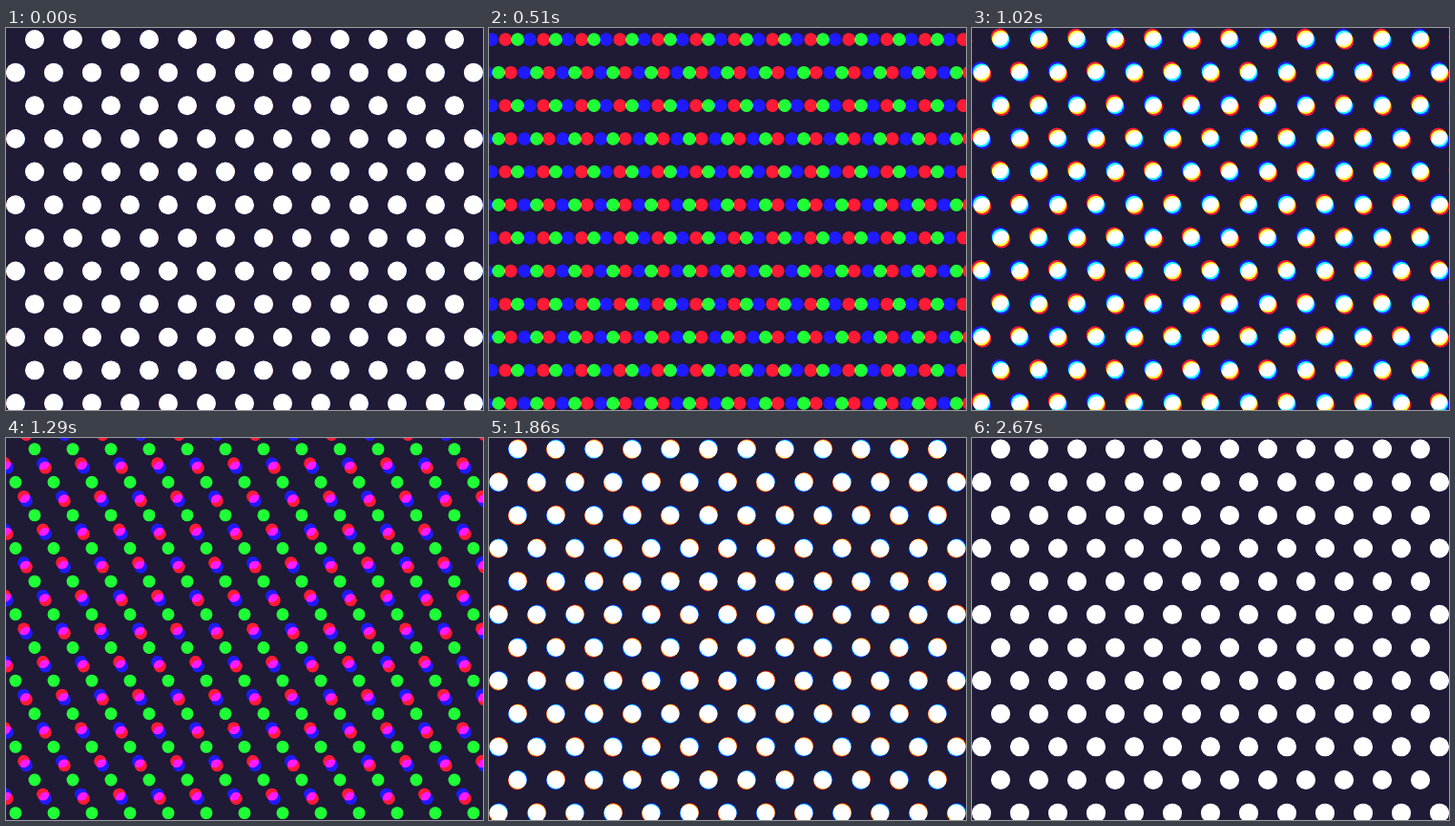
Write an HTML page with a canvas that moves like this. It is 500x400 px and loops after 2.7 s.

```html
<!DOCTYPE html>
<html lang="en">
<head>
<meta charset="utf-8">
<title>Colour dots</title>
<style>
  html, body { margin: 0; width: 100%; height: 100%; overflow: hidden; background: #1f1a36; }
  canvas { display: block; }
</style>
</head>
<body>
<canvas id="stage" width="500" height="400"></canvas>
<script>
const ctx = document.getElementById('stage').getContext('2d');
const TAU = Math.PI * 2;
const STEP = 30, PER_PHASE = 30, PHASES = 3;
const GAP = 40, ROW = GAP * Math.sqrt(3) / 2;
const R_MAX = 10, R_MIN = 6.4;

// Each phase slides along one lattice axis; neighbouring lines run opposite ways.
const phases = [
  { angle: 0, line: (a, b) => b, y: 12 },
  { angle: -TAU / 3, line: (a, b) => a, y: 11.6 },
  { angle: -TAU / 6, line: (a, b) => a + b, y: 11.6 }
];

const ease = p => p < 0.5 ? 2 * p * p : 1 - 2 * (1 - p) * (1 - p);

function drawDots(color, shift, radius, phase) {
  const dx = Math.cos(phase.angle) * shift;
  const dy = Math.sin(phase.angle) * shift;
  ctx.fillStyle = color;
  for (let b = -2; b <= 13; b++) {
    for (let a = -10; a <= 15; a++) {
      const dir = phase.line(a, b) % 2 ? -1 : 1;
      ctx.beginPath();
      ctx.arc(30 + GAP * (a + b / 2) + dir * dx, phase.y + ROW * b + dir * dy, radius, 0, TAU);
      ctx.fill();
    }
  }
}

function render(time) {
  const tick = Math.floor((time + 1) / STEP) % (PER_PHASE * PHASES);
  const phase = phases[Math.floor(tick / PER_PHASE)];
  const p = (tick % PER_PHASE + 1) / PER_PHASE;
  const shift = GAP * ease(p);
  const radius = R_MAX - (R_MAX - R_MIN) * (1 - Math.cos(TAU * p)) / 2;

  ctx.globalCompositeOperation = 'source-over';
  ctx.fillStyle = '#1f1a36';
  ctx.fillRect(0, 0, 500, 400);
  ctx.globalCompositeOperation = 'lighter';
  drawDots('#f00', shift, radius, phase);
  drawDots('#0f0', 0, radius, phase);
  drawDots('#00f', -shift, radius, phase);
}

function loop() {
  render(performance.now());
  requestAnimationFrame(loop);
}
loop();
</script>
</body>
</html>
```
